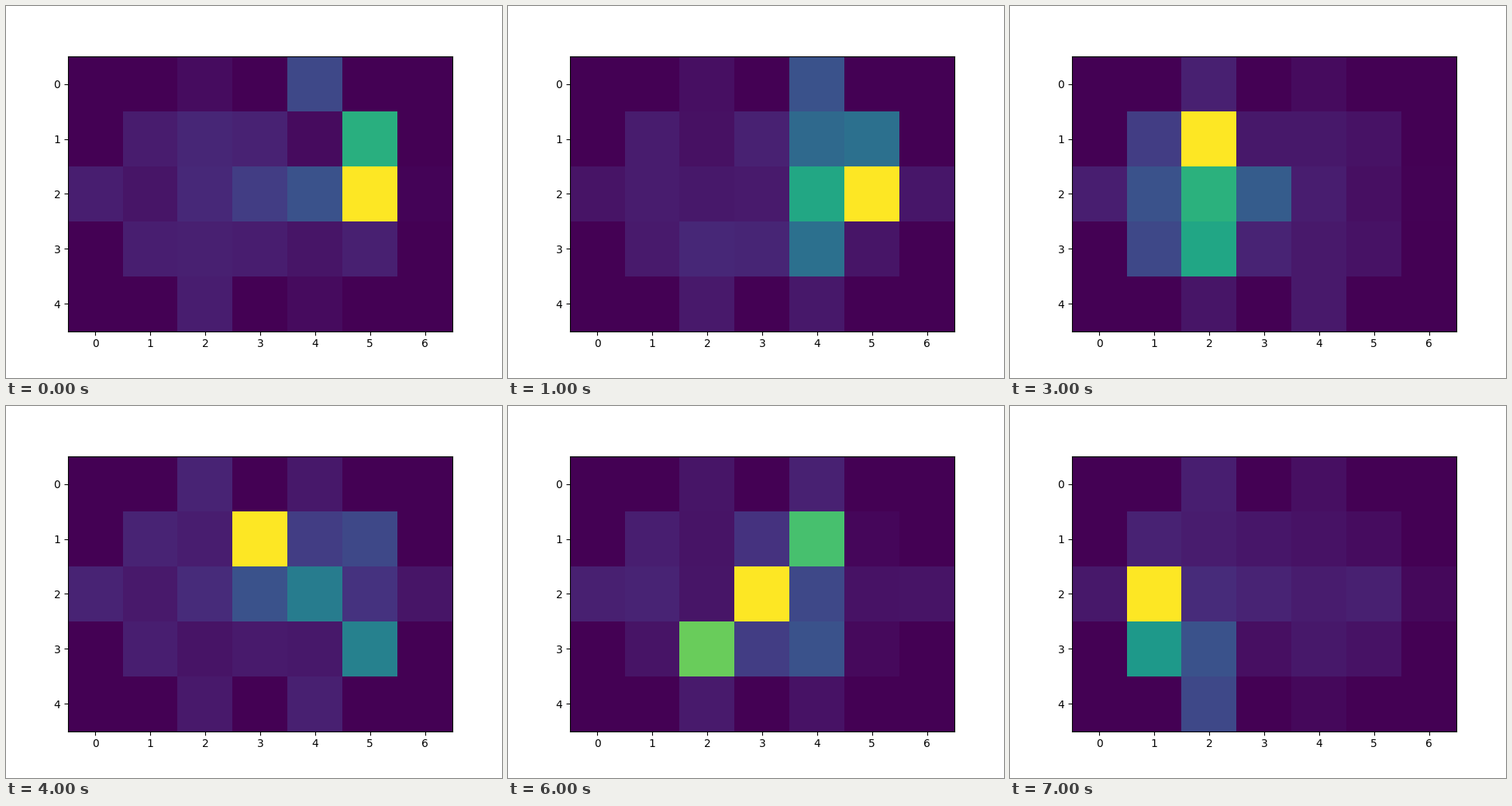
A matplotlib script that plays this animation: 640x480 px, repeating every 8000 ms.

```python
import numpy as np
import matplotlib.pyplot as plt
from matplotlib.animation import FuncAnimation

# Active sensor columns in each row; all other cells stay at zero.
LAYOUT = [(2, 4), range(1, 6), range(7), range(1, 6), (2, 4)]
ACTIVE = np.array([[c in cols for c in range(7)] for cols in LAYOUT])

# One step per second: the peak, strong cells with their level,
# and warm cells from brighter to dimmer.
STEPS = [
    ((2, 5), {(1, 5): 0.63}, [(2, 4), (0, 4), (2, 3)]),
    ((2, 5), {(2, 4): 0.6, (1, 5): 0.37, (1, 4): 0.34, (3, 4): 0.37},
     [(0, 4)]),
    ((2, 4), {(3, 4): 0.72, (1, 4): 0.59}, [(2, 5), (3, 5), (2, 6)]),
    ((1, 2), {(2, 2): 0.64, (3, 2): 0.59, (2, 3): 0.29},
     [(2, 1), (3, 1), (1, 1)]),
    ((1, 3), {(3, 5): 0.44, (2, 4): 0.42},
     [(2, 3), (1, 5), (1, 4), (2, 5)]),
    ((2, 3), {(1, 3): 0.57, (1, 4): 0.44, (3, 2): 0.43},
     [(3, 5), (2, 4), (0, 4)]),
    ((2, 3), {(3, 2): 0.77, (1, 4): 0.71},
     [(3, 4), (2, 4), (3, 3), (1, 3)]),
    ((2, 1), {(3, 1): 0.54}, [(3, 2), (4, 2)]),
]


def background(i):
    """Faint activity that fades away from the middle left, with noise."""
    rows, cols = np.indices(ACTIVE.shape)
    level = 0.09 - 0.012 * np.hypot(rows - 2, cols - 2)
    noise = np.random.default_rng(i).uniform(-0.035, 0.035, ACTIVE.shape)
    return np.where(ACTIVE, level + noise, 0)


def activity(i):
    peak, strong, warm = STEPS[i]
    field = background(i)
    for rank, cell in enumerate(warm):
        field[cell] = 0.25 - 0.035 * rank
    for cell, level in strong.items():
        field[cell] = level
    field[peak] = 1
    return field


fig, ax = plt.subplots(figsize=(6.4, 4.8), dpi=100)
image = ax.imshow(activity(0), cmap="viridis", vmin=0, vmax=1)


def update(i):
    image.set_data(activity(i))
    return [image]


anim = FuncAnimation(fig, update, frames=len(STEPS), interval=1000,
                     repeat=True, repeat_delay=0)
plt.show()
```
